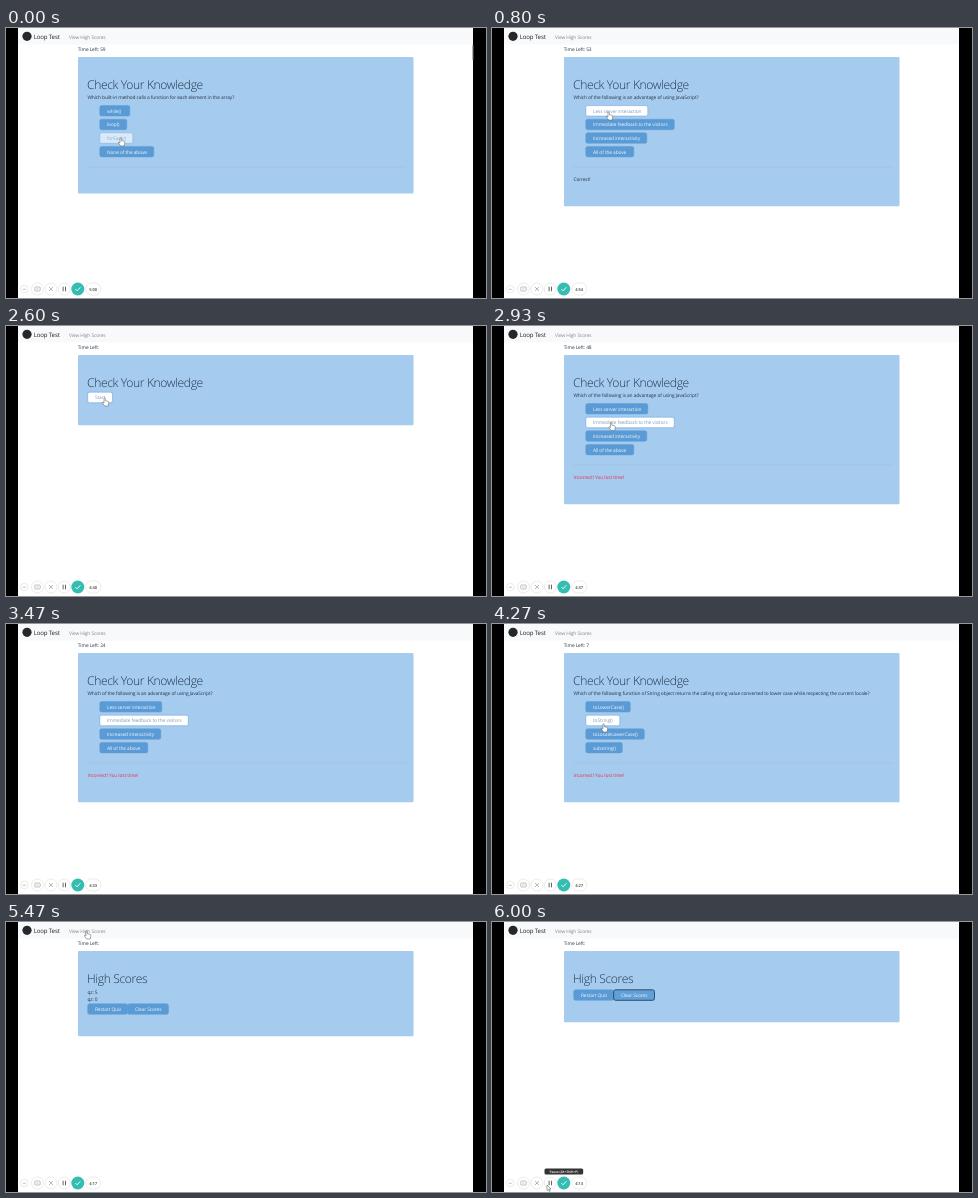
Animation of 480 by 270 pixels, one loop 6.07 s. Source, as an HTML page:

```html
<!DOCTYPE html>
<html lang="en">
<head>
<meta charset="utf-8">
<title>Quiz recording</title>
<style>
  html, body { margin: 0; width: 100%; height: 100%; overflow: hidden; background: #fff; }
  svg { display: block; width: 480px; height: 270px; }
  text {
    font: 4.84px "Open Sans", "Noto Sans", sans-serif;
    letter-spacing: -.02em;
    fill: #263544;
    text-rendering: geometricPrecision;
    white-space: pre;
  }
  .title { font-size: 12.1px; font-weight: 300; letter-spacing: -.03em; fill: #20364c; }
  .brand { font-size: 6.05px; fill: #1c1f22; }
  .link { fill: #85878a; }
  .label { fill: #eef6fd; }
  .hover { fill: #7c9dbc; }
  .hint { fill: #777; }
  .bad { fill: #e8304f; }
  .clock { font-size: 4.1px; font-weight: 600; fill: #444; text-anchor: middle; }
  .tip { font-size: 3.3px; font-weight: 600; fill: #fff; text-anchor: middle; }
</style>
</head>
<body>
<svg id="stage" viewBox="0 0 480 270"></svg>
<script>
const LOOP = 6070, STEPS = 91, STEP = LOOP / STEPS;
const RATE = 0.53;           // recorded seconds per step
const RUN2 = 40.8;           // step at which the second quiz starts
const LOSSES = [44, 47, 50, 58];
const INITIALS = 'qz';

const EACH = {
  ask: 'Which built-in method calls a function for each element in the array?',
  options: [['while()', 30], ['loop()', 27], ['forEach()', 33], ['None of the above', 54]]
};
const GAIN = {
  ask: 'Which of the following is an advantage of using JavaScript?',
  options: [['Less server interaction', 62], ['Immediate feedback to the visitors', 88.5],
            ['Increased interactivity', 61], ['All of the above', 48]]
};
const LOCALE = {
  ask: 'Which of the following function of String object returns the calling string value ' +
       'converted to lower case while respecting the current locale?',
  options: [['toLowerCase()', 44.5], ['toString()', 34], ['toLocaleLowerCase()', 58.5], ['substring()', 36.5]]
};

// [first step, view, argument, feedback]
const SCENES = [
  [0, quiz, EACH], [5, quiz, GAIN, 'Correct!'], [17, quiz, LOCALE, 'Correct!'],
  [20, results, { score: 5, typeAt: 27 }], [31, scores, [5]], [36, start],
  [41, quiz, EACH], [44, quiz, GAIN, 'Incorrect! You lost time!'],
  [58, quiz, LOCALE, 'Incorrect! You lost time!'],
  [77, results, { score: 0, typeAt: 78 }], [82, scores, [5, 0]], [87, scores, []]
];

// pointer tip: [step, x, y]
const PATH = [
  [0, 114, 110], [3, 114, 110], [6, 118, 110], [9, 116, 84], [12, 116, 84], [15, 112, 124],
  [18, 112, 110], [20, 111, 109], [23, 110, 104], [27, 110, 104], [29, 80, 9], [31, 80, 9],
  [34, 100, 79], [37, 98, 72], [41, 98, 72], [43, 112, 96], [47, 138, 98], [56, 138, 98],
  [59, 110, 120], [65, 111, 96], [70, 110, 110], [75, 110, 110], [78, 110, 104],
  [81, 80, 9], [82, 80, 9], [85, 140, 73], [87, 140, 73], [90, 55, 263]
];

let step, mouse, overLink;

const text = (x, cy, str, cls = '') => `<text x="${x}" y="${cy + 1.7}" class="${cls}">${str}</text>`;
const rect = (x, y, w, h, fill, more = '') =>
  `<rect x="${x}" y="${y}" width="${w}" height="${h}" fill="${fill}" ${more}/>`;
const line = (d, color, width = 0.7) =>
  `<path d="${d}" fill="none" stroke="${color}" stroke-width="${width}"/>`;
const inside = (x, y, w, h) =>
  mouse.x >= x && mouse.x <= x + w && mouse.y >= y && mouse.y <= y + h;

function button(x, y, w, label, focused) {
  const over = inside(x, y, w, 10.5);
  overLink = overLink || over;
  const fill = over ? '#fff' : focused ? '#609fd8' : '#5b9bd5';
  const edge = focused ? '#24435f' : '#5b9bd5';
  const pressed = over && step < 2 ? 'opacity=".6"' : '';
  return `<g ${pressed}>` +
    rect(x, y, w, 10.5, fill, `rx="1.9" stroke="${edge}" stroke-width="${focused ? 0.9 : 0.5}"`) +
    text(x + 7.2, y + 5.5, label, over ? 'hover' : 'label') + '</g>';
}

const panel = (bottom, title) =>
  rect(72, 29, 335.5, bottom - 29, '#a5cbef', 'rx="1"') +
  `<text x="81" y="61" class="title">${title}</text>`;

function quiz({ ask, options }, feedback) {
  const rows = options.map(([label, w], i) => button(93.8, 77.6 + i * 13.6, w, label)).join('');
  return panel(feedback ? 178.3 : 165.5, 'Check Your Knowledge') + text(81.5, 69.3, ask) + rows +
    line('M81.5 139H400', '#94b8da', 0.4) +
    (feedback ? text(81.5, 150.8, feedback, feedback[0] === 'I' ? 'bad' : '') : '');
}

function results({ score, typeAt }) {
  const typed = INITIALS.slice(0, Math.max(0, step - typeAt));
  return panel(123, 'Check Your Results') +
    text(81.5, 69.3, `Your final score is ${score}.`) +
    text(81.5, 81.4, 'Type your initials below and press enter to submit. ' +
      'Go to View High Score to see previous scores and restart quiz!') +
    rect(81.7, 89.8, 57, 8.6, '#fff', 'rx=".6" stroke="#222" stroke-width=".8"') +
    text(83, 94.4, typed || 'Enter your initials', typed ? '' : 'hint');
}

function scores(list) {
  const shift = list.length * 7;
  return panel(100.3 + shift, 'High Scores') +
    list.map((n, i) => text(81.5, 70 + i * 7, `${INITIALS}: ${n}`)).join('') +
    button(81.7, 67.8 + shift, 40, 'Restart Quiz') +
    button(121.7, 67.8 + shift, 40.8, 'Clear Scores', step >= 87);
}

function start() {
  return panel(99.3, 'Check Your Knowledge') + button(81.7, 66.2, 24.8, 'Start');
}

function timeLeft(view) {
  if (view === results) return 0;
  if (view !== quiz) return '';
  if (step < 20) return 59 - Math.floor(step * RATE);
  const lost = 10 * LOSSES.filter(s => s <= step).length;
  return 59 - Math.floor((step - RUN2) * RATE) - lost;
}

function header(view) {
  overLink = overLink || inside(62, 4, 38, 9);
  return rect(12, 0, 455, 16.5, '#f8f9fa') +
    '<circle cx="21" cy="8.3" r="4.6" fill="#25282b"/>' +
    text(27.7, 8.9, 'Loop Test', 'brand') + text(63, 8.8, 'View High Scores', 'link') +
    text(71.8, 20.8, `Time Left: ${timeLeft(view)}`);
}

function recorder() {
  const left = 300 - Math.floor(step * RATE);
  const clock = Math.floor(left / 60) + ':' + String(left % 60).padStart(2, '0');
  const disc = (x, r) =>
    `<circle cx="${x}" cy="261" r="${r}" fill="#fff" stroke="#e3e3e3" stroke-width=".7"/>`;
  const tip = step < 89 ? '' :
    rect(52.5, 246.4, 38.7, 6.2, '#333', 'rx="1.6"') +
    '<text x="71.8" y="250.7" class="tip">Pause (Alt+Shift+P)</text>';
  return disc(18.3, 3.8) + disc(31.5, 6) + disc(45, 6) + disc(58.3, 6) +
    line('M16.8 261.3h3', '#999', 0.6) +
    rect(28.8, 259, 5.4, 4, 'none', 'rx=".6" stroke="#999" stroke-width=".6"') +
    line('M30 261h3', '#aaa', 0.5) +
    line('M43 259l4 4m0-4l-4 4', '#888', 0.6) +
    line('M57.1 258.7v4.6m2.4-4.6v4.6', '#555', 0.9) +
    '<circle cx="71.8" cy="261" r="6.5" fill="#35bdb2"/>' +
    line('M69.4 261.1l1.7 1.7 3.2-3.5', '#fff', 0.9) +
    rect(79.8, 254.9, 15, 12.2, '#fff', 'rx="6" stroke="#e3e3e3" stroke-width=".7"') +
    `<text x="87.2" y="262.5" class="clock">${clock}</text>` + tip;
}

function pointer() {
  if (step >= 50 && step < 55) return '';
  const shape = overLink
    ? 'M0 0q1-.7 1.3.3v2.4l2.7.6q1 .3.8 1.4l-.6 3.3H.7L-1.5 5q-.3-1 .7-.8l.8.7Z'
    : 'M0 0v5.6l1.3-1.2 1 2.1.9-.4-1-2.1H4Z';
  return `<path d="${shape}" transform="translate(${mouse.x} ${mouse.y})"
    fill="#fff" stroke="#555" stroke-width=".5"/>`;
}

function pointerAt(s) {
  const i = Math.max(1, PATH.findIndex(p => p[0] >= s));
  const [s0, x0, y0] = PATH[i - 1], [s1, x1, y1] = PATH[i];
  const k = (s - s0) / (s1 - s0);
  return { x: x0 + (x1 - x0) * k, y: y0 + (y1 - y0) * k };
}

function draw() {
  mouse = pointerAt(step);
  overLink = false;
  const [, view, arg, feedback] = SCENES.findLast(s => s[0] <= step);
  stage.innerHTML = rect(0, 0, 480, 270, '#000') + rect(12, 0, 455, 270, '#fff') +
    header(view) + view(arg, feedback) +
    (step < 8 ? rect(466, 17, 1.3, 15, '#b5b5b5') : '') +
    recorder() + pointer();
}

const stage = document.getElementById('stage');
const begun = performance.now();

function tick() {
  const t = (performance.now() - begun) % LOOP;
  const next = Math.min(STEPS - 1, Math.floor((t + 5) / STEP));
  if (next !== step) {
    step = next;
    draw();
  }
  requestAnimationFrame(tick);
}
tick();
</script>
</body>
</html>
```
